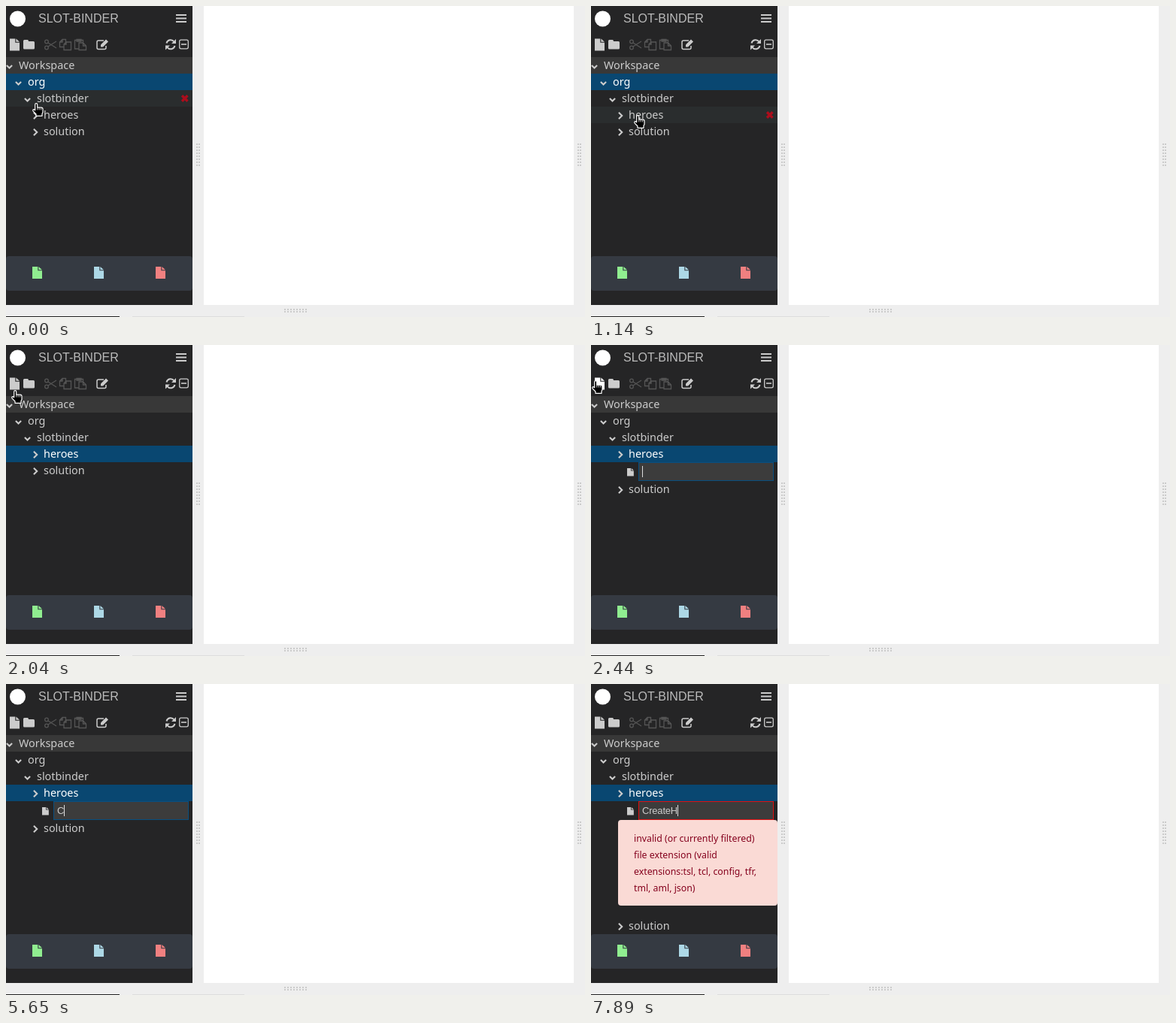
An HTML page that plays this animation: 770x414 px, repeating every 8 s.

```html
<!DOCTYPE html>
<html lang="en">
<head>
<meta charset="utf-8">
<title>File tree</title>
<style>
  html, body { margin: 0; width: 100%; height: 100%; overflow: hidden; background: #eee; }
  svg { display: block; width: 770px; height: 414px; }
  .tree { font: 14.4px "Noto Sans", "Open Sans", sans-serif; fill: #ccc; }
  .title { font: 16px "Liberation Sans", Arial, sans-serif; fill: #bbb; }
  .typed { font: 13px "Liberation Sans", Arial, sans-serif; letter-spacing: -.2px; fill: #ccc; }
  .error { font: 12.3px "Noto Sans", "Open Sans", sans-serif; fill: #85001d; }
  .line { fill: none; stroke: #ccc; stroke-width: 2; }
  .off { stroke: #555; stroke-width: 1.3; }
  .chev { fill: none; stroke: #ccc; stroke-width: 2.1; }
  .on text { fill: #fff; }
  .on .chev { stroke: #fff; }
  .dots { fill: none; stroke: #cbcbcb; stroke-width: 2; stroke-dasharray: 2 2; }
</style>
</head>
<body>
<svg viewBox="0 0 770 414" xmlns="http://www.w3.org/2000/svg">
  <defs>
    <path id="file" d="M0 0H7.3V5.2H13V16H0ZM8.4 0L13 4.2H8.4Z"/>
    <path id="down" class="chev" d="M.9 .9L4.5 4.5L8.1 .9"/>
    <path id="right" class="chev" d="M.9 .8L5.2 5L.9 9.2"/>
  </defs>

  <rect width="770" height="414" fill="#eee"/>
  <rect x="263" width="492" height="398" fill="#fff"/>
  <rect width="248" height="398" fill="#252526"/>
  <rect y="413" width="151" height="1" fill="#222"/>
  <rect x="168" y="413" width="149" height="1" fill="#ddd"/>
  <path class="dots" d="M254 183V213M257 183V213M761 183V213M764 183V213M370 404H400M370 407H400"/>

  <circle cx="15.5" cy="17" r="10.5" fill="#fff"/>
  <text class="title" x="43" y="22">SLOT-BINDER</text>
  <path class="line" d="M226 12H240M226 16.5H240M226 21H240"/>

  <use id="newFile" href="#file" x="5" y="43.5"/>
  <path fill="#ccc" d="M23 46.5q0-1.5 1.5-1.5h4q1.5 0 1.5 2h6.500q1.500 0 1.500 1.500v7.500q0 1.500-1.500 1.500h-12q-1.500 0-1.500-1.500z"/>
  <g class="line off">
    <circle cx="54" cy="47.500" r="2.300"/>
    <circle cx="54" cy="55.500" r="2.300"/>
    <path d="M56 49L67 56M56 54L67 47"/>
    <path d="M76.500 54.500H71.500V48L75 44.500H79.500V48M75 44.500V48H71.500M77 51L80 48H86.500V58.500H77ZM80 48V51H77"/>
    <path d="M96.500 57H91.500V45.500H102.500V48.500M97 49H102.500L106.500 53V58.500H97ZM102.500 49V53H106.500"/>
    <path fill="#555" d="M94 44.500H100V47H94Z"/>
  </g>
  <path class="line" style="stroke-width:1.500" d="M130 46H123q-2 0-2 2v7.500q0 2 2 2h8q2 0 2-2V53"/>
  <path fill="#ccc" d="M126 51.500L133 44.500L136 47.500L129 54.500H126Z"/>
  <path class="line" d="M213.500 49.500A5.600 5.600 0 0 1 223.500 47.500M224.500 53A5.600 5.600 0 0 1 214.500 55"/>
  <path fill="#ccc" d="M226 44V50H220ZM212 58.500V52.500H218Z"/>
  <rect class="line" style="stroke-width:1.300" x="230.700" y="45.200" width="11.600" height="11.600" rx="2"/>
  <path class="line" style="stroke-width:1.600" d="M233 51H240"/>

  <rect y="68" width="248" height="22" fill="#383838"/>
  <rect id="hover" width="248" height="22" fill="#2a2d2e"/>
  <rect id="selected" width="248" height="22" fill="#094771"/>
  <g class="tree">
    <g><use href="#down" x="0" y="78"/><text x="17" y="84">Workspace</text></g>
    <g id="org"><use href="#down" x="12" y="100"/><text x="29" y="106">org</text></g>
    <g><use href="#down" x="24" y="122"/><text x="41" y="128">slotbinder</text></g>
    <g id="heroes"><use href="#right" x="36" y="141"/><text x="50" y="150">heroes</text></g>
    <g id="solution"><use href="#right" x="36" y="163"/><text x="50" y="172">solution</text></g>
  </g>
  <path id="remove" d="M234 7.300L241.500 14.700M241.500 7.300L234 14.700" stroke="#ac0d1c" stroke-width="3.400"/>

  <g id="entry">
    <use href="#file" fill="#ccc" transform="translate(48 164) scale(.68 .65)"/>
    <rect id="field" x="63.500" y="156.500" width="179" height="24" fill="#3c3c3c"/>
    <text id="typed" class="typed" x="68" y="173"></text>
    <rect id="caret" y="161" width="1" height="15" fill="#ddd"/>
  </g>
  <g id="error" class="error">
    <rect x="36" y="181" width="212" height="114" rx="4" fill="#fadad5"/>
    <text x="57" y="210">invalid (or currently filtered)</text>
    <text x="57" y="232">file extension (valid</text>
    <text x="57" y="254">extensions:tsl, tcl, config, tfr,</text>
    <text x="57" y="276">tml, aml, json)</text>
  </g>

  <rect y="333" width="248" height="46" rx="4" fill="#353a42"/>
  <use href="#file" x="35" y="347" fill="#90ee90"/>
  <use href="#file" x="117" y="347" fill="#add8e6"/>
  <use href="#file" x="199" y="347" fill="#f08080"/>

  <g id="pointer" stroke="#fff" stroke-width="1.200" stroke-linejoin="round">
    <g id="hand">
      <path fill="#000" d="M3.700 2.200q0-1.600 1.500-1.600t1.500 1.600V6.200H12q2 0 2 2.200V12.500L13 14.500V17.300H5V15L1 10.800q-.7-1.800.8-2.200l1.900 1.200Z"/>
      <path fill="none" stroke-width=".800" d="M6.800 6.500V9.500M9.200 6.500V9.500M11.600 7V9.500"/>
    </g>
    <path id="arrow" fill="#000" d="M.7 .7V14.500L4 11.500L6.300 17L9 15.800L6.700 10.600H11Z"/>
  </g>
</svg>
<script>
  const LOOP = 8000, STEP = 40, HOVER_LAG = 80;
  const INPUT = 2400, ERROR = 5730;
  const WORD = "CreateH";
  const KEYS = [5650, 6000, 6470, 6640, 6860, 6980, 7890];
  const CARET_X = [68, 77, 81, 88, 95, 99, 106, 115];

  // Pointer path: time, left, top
  const PATH = [
    [0, 35, 129], [360, 36, 136], [640, 38, 130], [850, 38, 130],
    [1140, 57, 145], [1600, 57, 145], [1720, 32, 114], [1880, 18, 84],
    [2120, 2, 48], [2280, 2, 48], [2440, 1, 47], [2780, 1, 47],
    [2940, 300, 190], [3060, 638, 360]
  ];

  const el = id => document.getElementById(id);
  const show = (id, yes) => el(id).setAttribute("display", yes ? "inline" : "none");
  const set = (id, name, value) => el(id).setAttribute(name, value);
  const shift = (id, y) => set(id, "transform", `translate(0 ${y})`);

  function pointerAt(time) {
    const t = Math.max(0, time);
    const i = PATH.findIndex(p => p[0] >= t);
    if (i < 0) return PATH[PATH.length - 1].slice(1);
    if (i === 0) return PATH[0].slice(1);
    const [a, b] = [PATH[i - 1], PATH[i]];
    const k = (t - a[0]) / (b[0] - a[0]);
    return [1, 2].map(n => Math.round(a[n] + (b[n] - a[n]) * k));
  }

  // Top of the hovered tree row, or 0
  function hoveredRow(t) {
    const y = pointerAt(t - HOVER_LAG)[1];
    return t < 2200 && y >= 90 ? 90 + 22 * Math.floor((y - 90) / 22) : 0;
  }

  function draw(t) {
    const moveTime = Math.floor(t / STEP) * STEP;
    const [x, y] = pointerAt(t < 1140 || t >= 1180 ? moveTime : t);
    show("pointer", t < 3100);
    set("pointer", "transform", `translate(${x} ${y})`);
    show("hand", x < 248);
    show("arrow", x >= 248);
    set("newFile", "fill", x < 14 && y < 58 && t < 3100 ? "#fff" : "#ccc");

    const row = hoveredRow(t);
    show("hover", row);
    show("remove", row);
    shift("hover", row);
    shift("remove", row);

    const picked = t >= 1420;
    shift("selected", picked ? 134 : 90);
    set("org", "class", picked ? "" : "on");
    set("heroes", "class", picked ? "on" : "");

    const typing = t >= INPUT, failed = t >= ERROR;
    const count = KEYS.filter(k => t >= k).length;
    show("entry", typing);
    show("error", failed);
    shift("solution", failed ? 155 : typing ? 25 : 0);
    set("field", "stroke", failed ? "#e01010" : "#094f80");
    el("typed").textContent = WORD.slice(0, count);
    set("caret", "x", CARET_X[count]);
    show("caret", !(t >= 3630 && t < 4810) && !(t >= 7160 && t < 7890));
  }

  const start = performance.now();
  function tick() {
    draw((performance.now() - start) % LOOP);
    requestAnimationFrame(tick);
  }
  tick();
</script>
</body>
</html>
```
